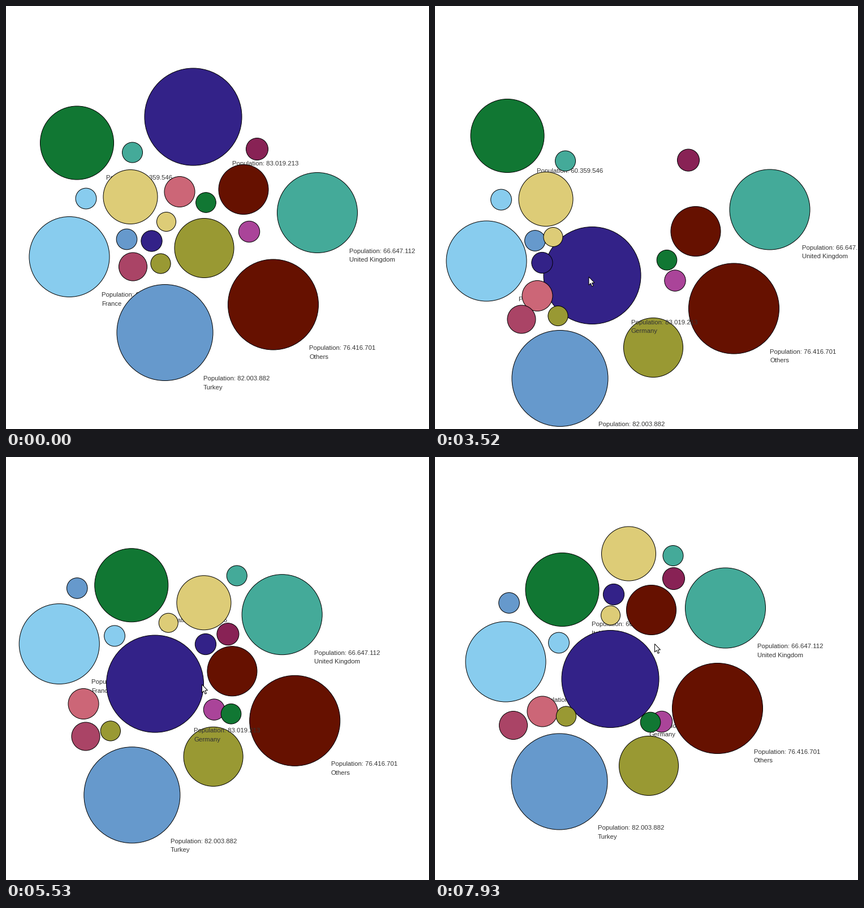
A matplotlib script that plays this animation: 748 by 748 pixels, repeating every 8000 ms.

```python
import numpy as np
import matplotlib.pyplot as plt
from matplotlib.animation import FuncAnimation
from matplotlib.patches import Circle, Polygon

SIZE, LOOP, INTERVAL = 748, 8000, 40
START, STEP = 2980, 77.34          # drag start and refresh period, ms
INK = "#333333"

plt.rcParams["font.family"] = "Liberation Sans"
fig = plt.figure(figsize=(SIZE / 100, SIZE / 100), dpi=100, facecolor="white")
ax = fig.add_axes([0, 0, 1, 1])
ax.set(xlim=(0, SIZE), ylim=(SIZE, 0))
ax.axis("off")


class Track:
    """Monotone cubic path through timed points."""

    def __init__(self, times, points):
        self.t = np.array(times, float)
        self.p = np.array(points, float)
        self.h = np.diff(self.t)
        shape = (-1,) + (1,) * (self.p.ndim - 1)
        d = np.diff(self.p, axis=0) / self.h.reshape(shape)
        a, b = d[:-1], d[1:]
        same = a * b > 0
        self.m = np.zeros_like(self.p)
        self.m[1:-1] = np.where(same, 2 * a * b / np.where(same, a + b, 1), 0)

    def __call__(self, t):
        t = np.clip(t, self.t[0], self.t[-1])
        i = min(np.searchsorted(self.t, t, side="right") - 1, len(self.h) - 1)
        h = self.h[i]
        u = (t - self.t[i]) / h
        p, m = self.p, self.m
        return ((1 + 2 * u) * (1 - u) ** 2 * p[i] + u * (1 - u) ** 2 * h * m[i]
                + u * u * (3 - 2 * u) * p[i + 1] + u * u * (u - 1) * h * m[i + 1])


class Bubble:
    def __init__(self, color, r, *poses, name="", people="", hover_only=False):
        self.r, self.poses, self.name = r, poses, name
        self.hover_only = hover_only
        self.disc = ax.add_patch(Circle(poses[0], r, fc=color, ec="black",
                                        lw=0.72, zorder=10))
        lines = ("Population: " + people, name) if name else ()
        self.texts = [ax.text(0, 0, s, size=8.2, color=INK, va="baseline")
                      for s in lines]

    def place(self, x, y, hover):
        self.disc.center = x, y
        for k, text in enumerate(self.texts):
            text.set_position((x + 0.8 * self.r, y + self.r + 15.5 * k))
            text.set_zorder(30 if hover else 1)
            text.set_visible(hover or not self.hover_only)


# From large to small, so that small bubbles lie on top.
bubbles = [
    Bubble("#332288", 86, (331, 196), (278, 476.5), (306, 480), (240, 420),
           (273.5, 393), (310, 392.5), name="Germany", people="83.019.213"),
    Bubble("#6699CC", 85, (281, 577.5), (221, 658.5), (213, 627), (208.5, 619.5),
           (229, 588.5), (220, 574), name="Turkey", people="82.003.882"),
    Bubble("#661100", 80, (472.5, 528), (528.5, 535), (518, 523.5), (489, 476.5),
           (520, 462), (499.5, 444.5), name="Others", people="76.416.701"),
    Bubble("#88CCEE", 71, (112, 443.5), (91, 451), (95.5, 430.5), (76, 337.5),
           (102, 327.5), (125, 362), name="France", people="67.028.048"),
    Bubble("#44AA99", 71, (550.5, 365.5), (592, 360), (546, 307.5), (478, 295.5),
           (492.5, 271.5), (513.5, 267), name="United Kingdom",
           people="66.647.112"),
    Bubble("#117733", 65, (125.5, 242), (128, 229.5), (152, 233.5), (213, 242.5),
           (225.5, 220), (225, 234.5), name="Italy", people="60.359.546"),
    Bubble("#999933", 52.5, (350.5, 428), (386, 604), (378, 606), (348, 543.5),
           (374.5, 524), (378, 546), name="Spain", people="46.937.060",
           hover_only=True),
    Bubble("#DDCC77", 48, (220, 337.5), (196, 341.5), (283.5, 206.5),
           (341.5, 266.5), (353.5, 254), (342.5, 171)),
    Bubble("#661100", 44, (420, 324.5), (461, 398.5), (449, 394.5), (377.5, 387.5),
           (409.5, 375), (382.5, 270.5), name="Poland", people="37.972.812",
           hover_only=True),
    Bubble("#CC6677", 27, (307, 328.5), (181, 512.5), (187, 493), (110, 447),
           (148.5, 432), (190, 450)),
    Bubble("#AA4466", 25, (224.5, 461), (153, 554), (132.5, 535), (131.5, 500),
           (145, 491.5), (138.5, 474.5)),
    Bubble("#882255", 19.5, (444, 253), (448, 272.5), (410, 308), (377, 322),
           (399, 309.5), (422, 215)),
    Bubble("#AA4499", 18.7, (430, 399), (424.5, 485.5), (414, 506.5), (348, 457.5),
           (376.5, 442), (401, 468)),
    Bubble("#332288", 18.6, (257.5, 415.5), (189.5, 454), (170, 359), (327, 340.5),
           (364, 327), (316, 243)),
    Bubble("#88CCEE", 18.4, (141.5, 340.5), (117, 342.5), (138, 330.5),
           (174.5, 329), (199.5, 311), (219, 328.5)),
    Bubble("#6699CC", 18.3, (213.5, 412.5), (177, 415), (95.5, 326), (117, 242.5),
           (129.5, 227.5), (131, 258)),
    Bubble("#44AA99", 18, (223.5, 259), (230.5, 274), (360, 192.5), (403, 221.5),
           (410.5, 205), (421, 174.5)),
    Bubble("#117733", 17.8, (353.5, 347.5), (410, 449), (405.5, 539.5),
           (377, 463), (407, 450.5), (381, 469)),
    Bubble("#999933", 17.6, (273.5, 455.5), (217.5, 548), (227.5, 510.5),
           (175, 510), (189, 473.5), (232, 458.5)),
    Bubble("#DDCC77", 17, (283.5, 381.5), (209, 408.5), (185.5, 322.5),
           (282, 311.5), (289.5, 285.5), (310.5, 280)),
]

poses = list(np.array([b.poses for b in bubbles]).transpose(1, 0, 2))
rest, pulled, swung, freed, calm, last = poses


def mix(a, b, u):
    return a + (b - a) * u


swarm = Track([START, 3520, 4070, 4760, 5530, 6310, 7160, 7930],
              [rest, pulled, swung, freed, mix(freed, calm, 0.7), calm,
               mix(calm, last, 0.72), last])

pointer = Track([440, 1060, 1210, 1760, 2520, 2830, START, 3520, 4070, 4760,
                 5300, 5900, 6310, 7930],
                [(600, 740), (278, 609), (278, 609), (352, 418), (352, 418),
                 (320, 206), (320, 206), (272, 479), (303, 482), (270, 414),
                 (300, 411), (420, 386), (424.5, 384), (388.5, 330.5)])

ARROW = np.array([(0, 0), (0, 14.5), (3.3, 11.4), (5.7, 16.8), (8, 15.8),
                  (5.6, 10.6), (10, 10.4)])
arrow = ax.add_patch(Polygon(ARROW, closed=True, fc="white", ec="black",
                             lw=0.72, zorder=60))


def snap(t):
    """Hold each pose for one refresh period."""
    return START + STEP * np.floor((t - START) / STEP + 0.1)


def draw(i):
    t = (i + 0.75) * INTERVAL
    now = snap(t)
    tip = pointer(now)
    shown = t >= 440
    arrow.set_xy(ARROW + tip)
    arrow.set_visible(shown)

    spots = swarm(now)
    under = [b for b, c in zip(bubbles, spots)
             if shown and b.name and np.hypot(*(tip - c)) < b.r]
    target = under[-1] if under else None
    for b, (x, y) in zip(bubbles, spots):
        b.place(x, y, b is target)
    return []


anim = FuncAnimation(fig, draw, frames=LOOP // INTERVAL, interval=INTERVAL,
                     repeat=True, repeat_delay=0, blit=False)
plt.show()
```
